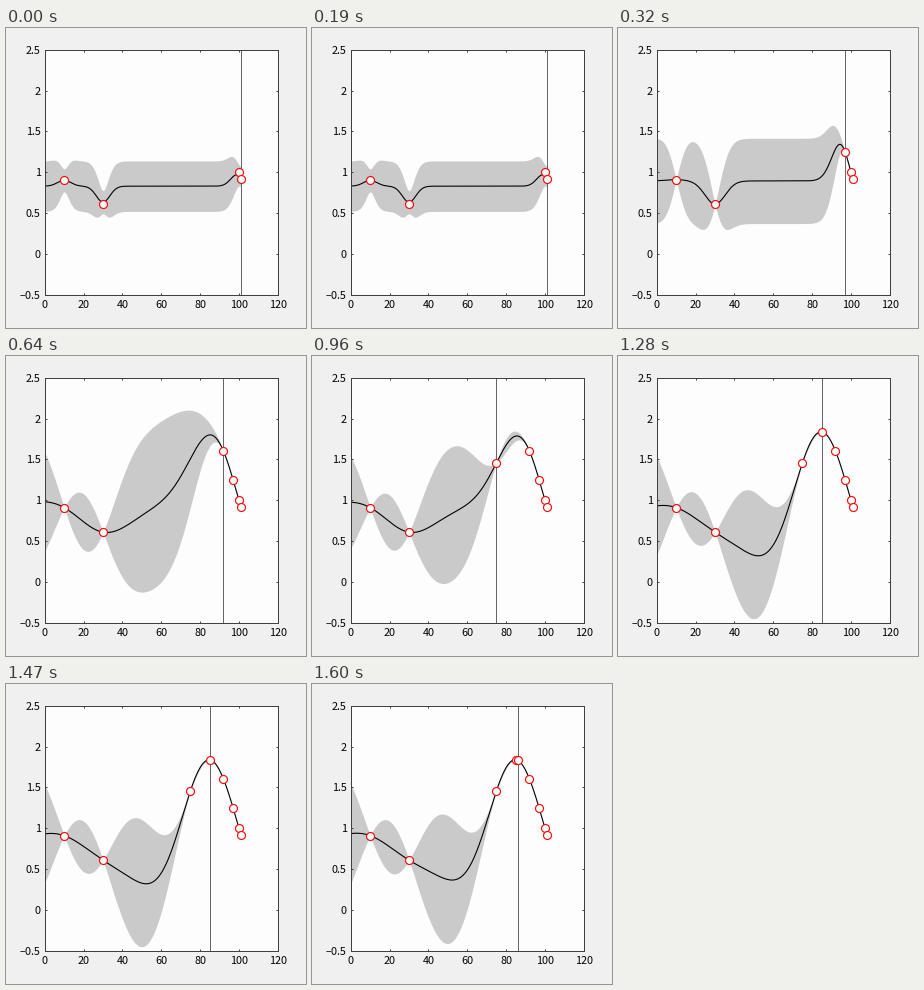
A matplotlib script for the animation above (1920 ms loop, 300x300 px).

```python
import numpy as np
import matplotlib.pyplot as plt
from matplotlib.animation import ArtistAnimation

PX = 0.72  # one pixel in points at 100 dpi
SIZE = 300
LEFT, RIGHT, TOP, BOTTOM = 38.8, 271.8, 21.8, 266.8

plt.rcParams["font.family"] = "Noto Sans CJK JP"

# Sampled points in the order they are visited
SAMPLES = np.array([
    (10, 0.91), (30, 0.61), (100, 1.0005), (101, 0.9197),
    (97, 1.249), (92, 1.604), (75, 1.459), (85, 1.838), (86, 1.833),
])
SCALES = [3.5, 5.2, 14.2, 13.7, 16, 16]  # kernel length at each step


def kernel(a, b, scale):
    return np.exp(-0.5 * ((a[:, None] - b[None, :]) / scale) ** 2)


def regress(pts, x, scale, noise):
    """Gaussian process with its level and spread fitted to the points."""
    px, py = pts.T
    cov = kernel(px, px, scale) + noise**2 * np.eye(len(px))
    inv_one = np.linalg.solve(cov, np.ones_like(px))
    base = inv_one @ py / inv_one.sum()
    resid = py - base
    alpha = np.linalg.solve(cov, resid)
    spread = np.sqrt(resid @ alpha / len(px))
    cross = kernel(px, x, scale)
    mean = base + alpha @ cross
    var = 1 + noise**2 - np.sum(cross * np.linalg.solve(cov, cross), axis=0)
    return mean, 2 * spread * np.sqrt(np.maximum(var, 0))


def label(v):
    return f"{v:g}".replace("-", "\u2212")


fig = plt.figure(figsize=(SIZE / 100, SIZE / 100), dpi=100, facecolor="#f0f0f0")
ax = fig.add_axes([LEFT / SIZE, 1 - BOTTOM / SIZE,
                   (RIGHT - LEFT) / SIZE, (BOTTOM - TOP) / SIZE])
ax.set_facecolor("#fdfdfd")
ax.set_xlim(0, 120)
ax.set_ylim(-0.5, 2.5)
xticks = np.arange(0, 121, 20)
yticks = np.arange(-0.5, 2.6, 0.5)
ax.set_xticks(xticks, map(label, xticks))
ax.set_yticks(yticks, map(label, yticks))
ax.tick_params(direction="in", top=True, right=True, length=2.5 * PX,
               width=PX, color="0.25", labelsize=10.8 * PX, pad=4 * PX)
ax.tick_params(axis="x", pad=5 * PX)
for spine in ax.spines.values():
    spine.set(linewidth=PX, color="0.25")

grid = np.linspace(0, 101, 405)


def draw_step(i, scale):
    pts = SAMPLES[:i + 4]
    noise = 0.004 if i else 0.353  # only the first fit is noisy
    mean, half = regress(pts, grid, scale, noise)
    band = ax.fill_between(grid, mean - half, mean + half,
                           color="#cacaca", linewidth=0, zorder=1)
    curve, = ax.plot(grid, mean, color="black", lw=1.1 * PX, zorder=2)
    probe = ax.axvline(pts[-1, 0], color="0.4", lw=PX, zorder=2.2)
    dots, = ax.plot(*pts.T, "o", ms=8 * PX, mfc="white",
                    mec="#f01010", mew=1.2 * PX, zorder=4)
    return [band, curve, probe, dots]


frames = [draw_step(i, scale) for i, scale in enumerate(SCALES)]
anim = ArtistAnimation(fig, frames, interval=320, repeat=True, repeat_delay=0)
plt.show()
```
